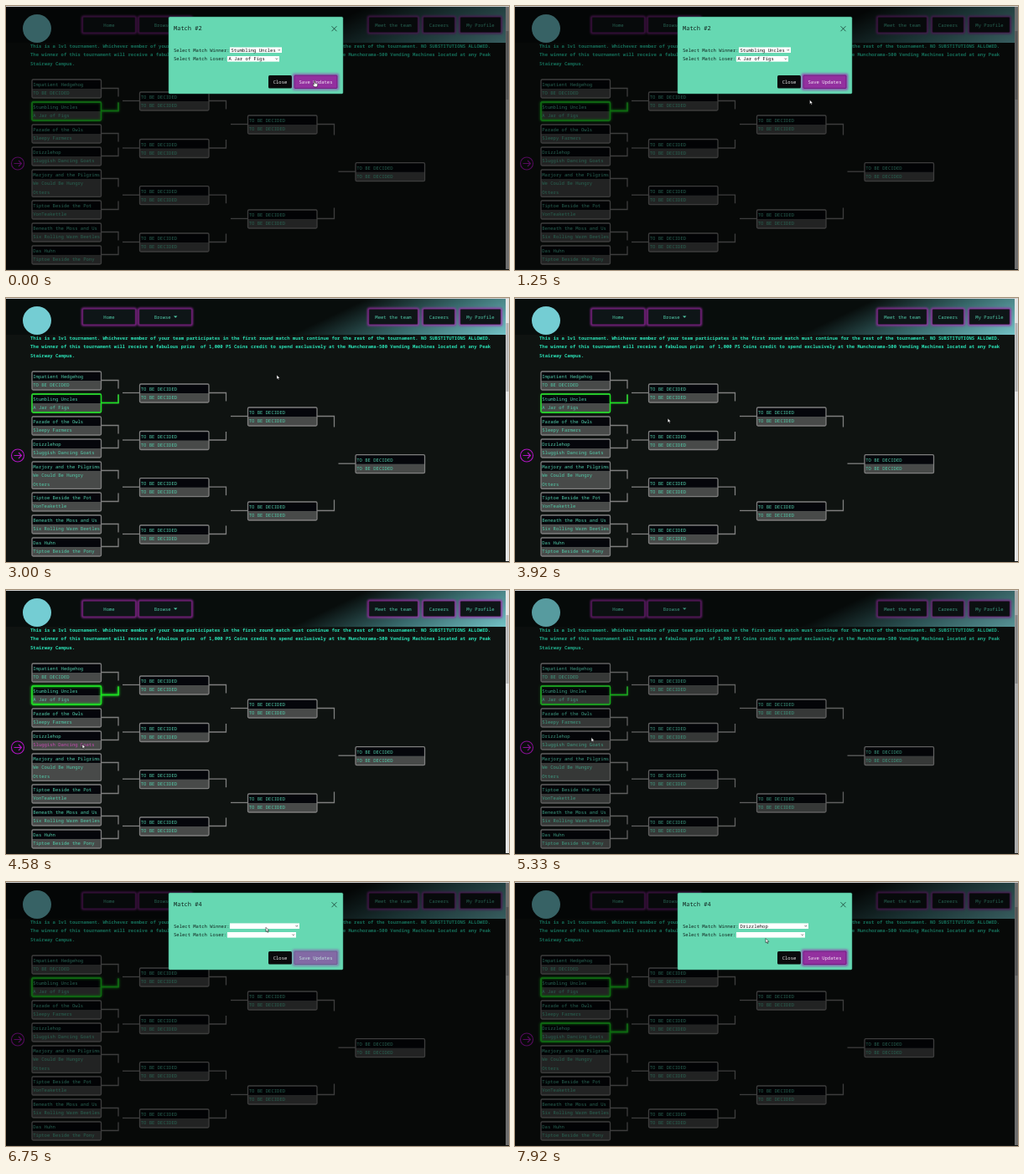
Recreate the animation shown at these times as an HTML page. Size 600 by 316 pixels, loop 8 s.

```html
<!DOCTYPE html>
<html lang="en">
<head>
<meta charset="utf-8">
<title>Tournament bracket</title>
<style>
html, body { margin: 0; width: 100%; height: 100%; overflow: hidden; background: #0f1311; }
svg { display: block; width: 600px; height: 316px; }
text { font: 5.55px "Noto Sans Mono", "DejaVu Sans Mono", monospace; white-space: pre; text-rendering: geometricPrecision; }
.intro text { font-weight: 600; }
.blur { filter: blur(1.8px); }
.neon { filter: blur(1.2px); opacity: .8; }
</style>
</head>
<body>
<svg id="stage" viewBox="0 0 600 316"></svg>
<script>
const LOOP = 8000, GREEN = '#16e51c', GREY = '#7f7f7f', TEAL = '#52ccaa', VIOLET = '#b016c2';
const TBD = 'TO BE DECIDED';
const stage = document.getElementById('stage');

const rect = (x, y, w, h, fill, extra = '') =>
  `<rect x="${x}" y="${y}" width="${w}" height="${h}" fill="${fill}" ${extra}/>`;
const path = (d, stroke, extra = '') =>
  `<path d="${d}" fill="none" stroke="${stroke}" stroke-width="1.3" ${extra}/>`;
// y is the middle of the line of text
const text = (s, x, y, fill, extra = '') =>
  `<text x="${x}" y="${y + 2}" fill="${fill}" ${extra}>${s}</text>`;
const mid = 'text-anchor="middle"';

// Bracket columns: left edge, length of the joining line, matches as [first line, top name, bottom name lines]
const columns = [
  [31, 10, [
    [94, 'Impatient Hedgehog', TBD],
    [121, 'Stumbling Uncles', 'A Jar of Figs'],
    [148, 'Parade of the Owls', 'Sleepy Farmers'],
    [175, 'Drizzlehop', 'Sluggish Dancing Goats'],
    [202, 'Marjory and the Pilgrims', 'We Could Be Hungry', 'Otters'],
    [239, 'Tiptoe Beside the Pot', 'VonTeakettle'],
    [266, 'Beneath the Moss and Us', 'Six Rolling Warm Beetles'],
    [293, 'Das Huhn', 'Tiptoe Beside the Pony']]],
  [159.5, 10, [109, 165.5, 221.7, 278].map(y => [y, TBD, TBD])],
  [288.5, 13, [137, 250].map(y => [y, TBD, TBD])],
  [417, 0, [[193.7, TBD, TBD]]]
];

function match(x, join, [y, ...names], i, id) {
  const top = y - 6, h = names.length * 10.4 + 1.2, c = y + 4.5;
  const frame = color =>
    rect(x, top, 82.5, h, 'none', `rx="1.5" stroke="${color}" stroke-width="1.3"`) +
    (join ? path(`M${x + 82.5} ${c}h20.5v${i % 2 ? -join : join}`, color) : '');
  return rect(x, top, 82.5, h, '#05060b') + rect(x, y + 5, 82.5, h - 11, '#484a49') + frame(GREY) +
    (id ? `<g id="${id}"><g class="blur pulse">${frame(GREEN)}${frame(GREEN)}${frame(GREEN)}</g>${frame(GREEN)}</g>` : '') +
    (x > 100 ? path(`M${x - 20.5} ${c}h20.5`, GREY) : '') +
    names.map((n, k) => text(n, x + 1.3, y + k * 10.4, TEAL, id === 'win4' && k ? 'id="hover"' : '')).join('');
}

const bracket = columns.map(([x, join, list], col) =>
  list.map((m, i) => match(x, join, m, i, col ? '' : { 1: 'win2', 3: 'win4' }[i])).join('')).join('');

const navButton = (x, w, label) =>
  rect(x - .5, 13, w + 1, 19, 'none', 'class="neon" rx="1" stroke="#a02cab" stroke-width="3.2"') +
  rect(x, 13.5, w, 18, '#0e1517', 'rx="1" stroke="#4a1650" stroke-width=".6"') +
  text(label, x + w / 2, 22.5, TEAL, mid);

const select = (id, x, y) => `<g>${rect(x, y, 62, 6.6, '#fff', `id="${id}Box"`)}
  ${text('', x + 1.5, y + 3.4, '#111', `id="${id}"`)}
  <path id="${id}Tip" d="M-4.5 ${y + 2.6}l1.3 1.3 1.3-1.3" fill="none" stroke="#222" stroke-width=".6"/></g>`;

stage.innerHTML = `
<defs><linearGradient id="sky" gradientUnits="userSpaceOnUse" x1="340" y1="44" x2="390" y2="149">
  <stop offset="0" stop-color="#080d0c"/><stop offset=".45" stop-color="#37686a"/>
  <stop offset="1" stop-color="#7accd0"/></linearGradient></defs>
${rect(0, 0, 600, 316, '#0f1311')}
<g class="intro">
${text('This is a 1v1 tournament. Whichever member of your team participates in the first round match must continue for the rest of the tournament. NO SUBSTITUTIONS ALLOWED.', 29, 48, '#2adfb4')}
${text('The winner of this tournament will receive a fabulous prize  of 1,000 PS Coins credit to spend exclusively at the Munchorama-500 Vending Machines located at any Peak', 29, 58.4, '#2adfb4')}
${text('Stairway Campus.', 29, 68.8, '#2adfb4')}</g>
${bracket}
<g fill="none" stroke="${VIOLET}" stroke-width="1.1"><circle cx="14" cy="188.5" r="7.5"/>
<path d="M9.5 188.5h9m-3.5-3.5l3.5 3.5-3.5 3.5"/></g>
${rect(0, 1, 600, 43, 'url(#sky)')}
${navButton(92, 62, 'Home')}${navButton(159, 62, 'Browse  ')}
<path d="M200 21.5h4.4l-2.2 2.2z" fill="${TEAL}"/>
${navButton(433, 58, 'Meet the team')}${navButton(498, 37, 'Careers')}${navButton(542, 48, 'My Profile')}
<circle cx="37" cy="27" r="17" fill="#74cdd3"/>
${rect(596, 1, 4, 314, '#e4e4e4')}${rect(596.5, 30, 3, 82, '#b4b4b4')}
${rect(0, 1, 600, 314, '#000', 'id="shade"')}
${rect(0, 0, 600, 1, '#d0d0d0')}
<g id="modal">
${rect(194, 13, 208, 92, '#66d8b2', 'rx="1.5" stroke="#3b8f75" stroke-width=".5"')}
${text('', 200, 27.3, '#10231d', 'id="title" style="font-size:7px"')}
<path d="M388.5 24.2l6 6m0-6l-6 6" stroke="#153a2e" stroke-width=".8"/>
${text('Select Match Winner:', 200, 52.6, '#10231d')}${text('Select Match Loser:', 200, 63.2, '#10231d')}
${select('winner', 267, 49.4)}${select('loser', 264, 60)}
${rect(313, 83, 28, 15.5, '#0a0a0c', 'rx="1.5"')}${text('Close', 327, 90.8, '#eee', mid)}
<g id="save">${rect(343.5, 82.5, 52, 16.5, 'none', 'class="blur pulse" stroke="#a020b0" stroke-width="2.5"')}
${rect(344, 83, 51, 15.5, '#93309f', 'rx="1" stroke="#6b1279" stroke-width=".8"')}
${text('Save Updates', 369.5, 90.8, '#f3e6f5', mid)}</g></g>
<g id="cursor" stroke="#000" stroke-width=".5" fill="#fff">
<path id="arrow" d="M0-1.5v5.2l1.2-1 .9 1.9.9-.4-.9-1.8h1.7z"/>
<path id="hand" d="M-.6-3q.7-.7 1.3 0v2.3l2.6.7q.7.3.5 1.2l-.7 2.6h-3.4l-2-2.8q.1-1 1.7.1z"/></g>`;

const $ = id => document.getElementById(id);
const show = (id, on) => $(id).style.display = on ? '' : 'none';
const ramp = (t, a, b) => Math.min(1, Math.max(0, (t - a) / (b - a)));

// Linear blend between [time, ...values] keys
function track(keys, t) {
  const i = Math.max(1, keys.findIndex(k => k[0] >= t));
  const [a, b] = [keys[i - 1], keys[i]], p = ramp(t, a[0], b[0]);
  return a.slice(1).map((v, k) => v + (b[k + 1] - v) * p);
}

const pointer = [[0, 368, 93], [500, 368, 93], [900, 362, 112], [1300, 350, 114], [1830, 334, 95],
  [2800, 333, 95], [3000, 323, 93.5], [3300, 300, 97], [3670, 228, 125], [4420, 91, 186], [4620, 91, 186],
  [5080, 91, 178], [5670, 91, 178], [6080, 280, 100], [6400, 310, 53], [6900, 310, 57],
  [7330, 290, 75], [7600, 305, 64], [7920, 299, 69], [LOOP, 299, 69]];

function setSelect(id, value, width) {
  const box = $(id + 'Box');
  box.setAttribute('width', width);
  $(id + 'Tip').setAttribute('transform', `translate(${+box.getAttribute('x') + width})`);
  $(id).textContent = value;
}

function draw(t) {
  const second = t > 4000, picked = t >= 7000;
  const pulse = .5 + .5 * Math.cos((t - 4580) / 1100 * 2 * Math.PI);
  document.querySelectorAll('.pulse').forEach(e => e.style.opacity = .1 + .9 * pulse);

  show('win4', picked);
  $('hover').setAttribute('fill', t > 4400 && t < 4900 ? '#c94bb4' : TEAL);

  // Backdrop opens before the dialog and closes after it
  $('shade').style.opacity = .52 * (second ? ramp(t, 5260, 5410) : 1 - ramp(t, 2850, 3000));
  const slide = second ? (1 - ramp(t, 5420, 5720)) ** 2 : ramp(t, 2770, 3070) ** 2;
  $('modal').style.opacity = second ? ramp(t, 5420, 5570) : 1 - ramp(t, 2770, 2920);
  $('modal').setAttribute('transform', `translate(0 ${-16 * slide})`);

  $('title').textContent = second ? 'Match #4' : 'Match #2';
  setSelect('winner', second ? (picked ? 'Drizzlehop' : '') : 'Stumbling Uncles', second ? 83 : 62);
  setSelect('loser', second ? '' : 'A Jar of Figs', second ? 82 : 62);
  $('save').style.opacity = second && !picked ? .65 : 1;

  const [x, y] = track(pointer, t), hand = t < 600 || (t > 1700 && t < 2830);
  $('cursor').setAttribute('transform', `translate(${x} ${y})`);
  show('hand', hand);
  show('arrow', !hand);
}

const start = performance.now();
function tick() {
  draw((performance.now() - start) % LOOP);
  requestAnimationFrame(tick);
}
tick();
</script>
</body>
</html>
```
